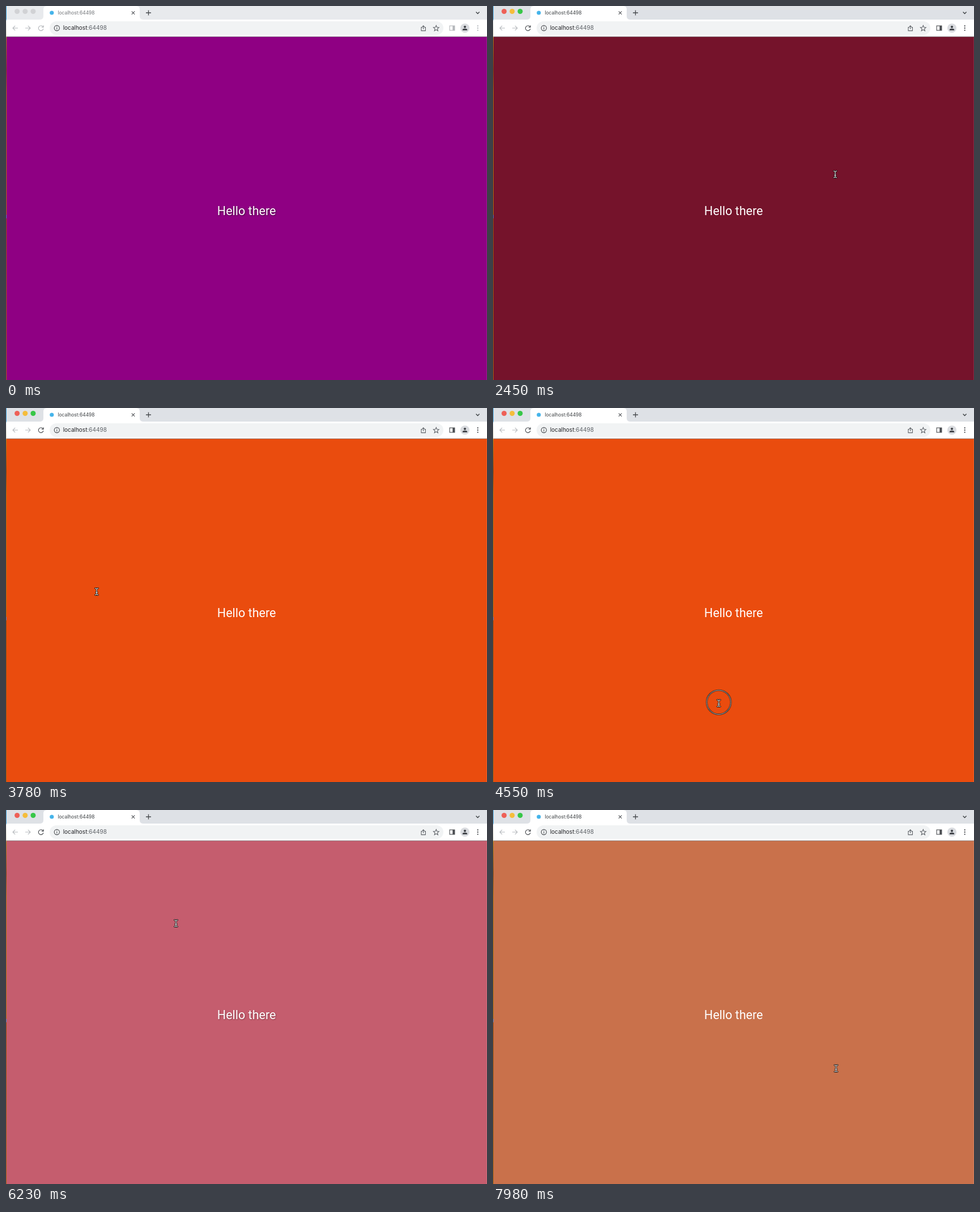
Recreate the animation shown at these times as an HTML page. Size 849 by 660 pixels, loop 8000 ms.

```html
<!DOCTYPE html>
<html lang="en">
<head>
<meta charset="utf-8">
<title>localhost:64498</title>
<style>
html, body { margin: 0; width: 100%; height: 100%; overflow: hidden; background: #fff; }
svg { display: block; animation: focus 8s step-end infinite; }
.ui { font-family: Inter, "Open Sans", sans-serif; }
.hello { font: 21.5px Roboto, sans-serif; fill: #fff; text-anchor: middle; animation: shade 8s step-end infinite; }
.line { fill: none; stroke: #5f6368; stroke-width: 1.1; }
.strip { fill: var(--strip); }
.tab { fill: var(--tab); }
.ink { stroke: var(--ink); }
.dot { fill: var(--ink); }
.page { animation: paint 8s step-end infinite; }
.cursor { animation: move 8s ease-in-out infinite; }
.ring { fill: none; animation: press 8s step-end infinite; }
.beam { fill: none; stroke-linecap: round; }

@keyframes focus {
  0% { --strip: #e8eaed; --tab: #73767a; --ink: #b4b7bb; --red: #d1d2d5; --amber: #d1d2d5; --green: #d1d2d5; }
  6.1%, 100% { --strip: #dee1e6; --tab: #3c4043; --ink: #4a4d51; --red: #ee6057; --amber: #f5bd3b; --green: #37c748; }
}
@keyframes paint {
  0% { fill: #8f0083; }
  16.6% { fill: #76685c; }
  27.1% { fill: #75132b; }
  36.7% { fill: #5b0950; }
  47.2% { fill: #ea4c0e; }
  57.7% { fill: #7a6e68; }
  67.3% { fill: #2458e2; }
  77.8% { fill: #c55d6e; }
  89.2% { fill: #7c7870; }
  98.8%, 100% { fill: #c9714b; }
}
@keyframes shade {
  0% { filter: drop-shadow(1px 1px 1px rgba(0, 0, 0, .55)); }
  16.6% { filter: none; }
  77.8% { filter: drop-shadow(1px 1px 1px rgba(0, 0, 0, .3)); }
  89.2%, 100% { filter: none; }
}
@keyframes press {
  0%, 6.1%, 16.6%, 27.1%, 36.7%, 47.2%, 57.7%, 67.3%, 77.8%, 89.2%, 98.8%, 100% { opacity: 0; }
  4.9%, 14.8%, 25.3%, 34.9%, 45.4%, 55.9%, 65.6%, 76%, 87.4%, 97% { opacity: 1; }
}
@keyframes move {
  0% { transform: translate(560px, 680px); }
  4.7%, 6.2% { transform: translate(520px, 430px); }
  14.6%, 16.8% { transform: translate(330px, 250px); }
  25.1%, 27.2% { transform: translate(590px, 290px); }
  30.6% { transform: translate(604px, 297px); }
  34.7%, 36.8% { transform: translate(420px, 460px); }
  42% { transform: translate(168.5px, 319px); }
  45.2%, 47.3% { transform: translate(160px, 324px); }
  55.6%, 57.8% { transform: translate(398.5px, 521px); }
  63% { transform: translate(684px, 300px); }
  65.5%, 67.6% { transform: translate(562.5px, 227px); }
  75.8%, 77.9% { transform: translate(300px, 200px); }
  87.2%, 89.3% { transform: translate(604px, 194px); }
  96.8%, 100% { transform: translate(605.5px, 456px); }
}
</style>
</head>
<body>
<svg width="849" height="660" viewBox="0 0 849 660">
  <defs>
    <linearGradient id="edge" x2="0" y2="1">
      <stop offset="0" stop-color="#3f9fd8"/>
      <stop offset=".035" stop-color="#3f9fd8"/>
      <stop offset=".04" stop-color="#e4e6e8"/>
      <stop offset=".08" stop-color="#d8d2c0"/>
      <stop offset=".085" stop-color="#a8841c"/>
      <stop offset=".17" stop-color="#7a4a12"/>
      <stop offset=".23" stop-color="#a8700f"/>
      <stop offset=".558" stop-color="#a8700f"/>
      <stop offset=".559" stop-color="#4a78c0"/>
      <stop offset=".567" stop-color="#4a78c0"/>
      <stop offset=".568" stop-color="#96500f"/>
      <stop offset="1" stop-color="#a06414"/>
    </linearGradient>
    <path id="ibeam" d="M-2.5-5.8Q0-5.8 0-4.4Q0-5.8 2.5-5.8M0-4.4V4.4M-2.5 5.8Q0 5.8 0 4.4Q0 5.8 2.5 5.8M-1.2 1.6H1.2"/>
  </defs>

  <!-- tab strip -->
  <rect class="strip" width="849" height="24"/>
  <path d="M59 24Q66 24 66 18V6Q66 0 72 0H230Q236 0 236 6V18Q236 24 243 24Z" fill="#fff"/>
  <circle cx="19.6" cy="9.5" r="4.5" fill="var(--red)"/>
  <circle cx="33.8" cy="9.5" r="4.5" fill="var(--amber)"/>
  <circle cx="47.9" cy="9.5" r="4.5" fill="var(--green)"/>
  <circle cx="80.8" cy="12" r="3.6" fill="#45b4ea"/>
  <text class="ui tab" x="91.5" y="15" font-size="8.45">localhost:64498</text>
  <path class="line" d="M221.8 9.4l5.4 5.4m0-5.4l-5.4 5.4" style="stroke:#505357"/>
  <path class="line" d="M247 12h9M251.5 7.5v9" style="stroke:#46494d;stroke-width:1.3"/>
  <path class="line" d="M829.6 10.5l3 3 3-3" style="stroke:#3c4043;stroke-width:1.3"/>

  <!-- toolbar -->
  <rect y="24" width="849" height="30" fill="#fff"/>
  <rect x="77" y="27" width="695" height="24" rx="12" fill="#f1f3f4"/>
  <path class="line" d="M21 39h-9m4.2-4.2L12 39l4.2 4.2M34 39h9m-4.2-4.2L43 39l-4.2 4.2" style="stroke:#b6b9bd"/>
  <path class="line ink" d="M65.3 36.6A4.4 4.4 0 1 0 66 40.2M66.1 34.2v3.3h-3.3" style="stroke-width:1.2"/>
  <circle class="line" cx="89.8" cy="39" r="4.6" style="stroke:#484b4f"/>
  <path class="line" d="M89.8 38.4v3.1M89.8 36.3v1.1" style="stroke:#484b4f"/>
  <text class="ui" x="100.7" y="42.4" font-size="10" fill="#202124">localhost<tspan fill="#5f6368">:64498</tspan></text>
  <path class="line" d="M734.8 37.6h-1.8v6h7.4v-6h-1.8M736.7 41v-6.2m-2 2l2-2 2 2"/>
  <path class="line" d="M759.3 34.3l1.4 3.3 3.5.3-2.7 2.3.8 3.5-3-1.9-3 1.9.8-3.5-2.7-2.3 3.5-.3Z"/>
  <rect class="line ink" x="783.1" y="35" width="8.8" height="8"/>
  <rect class="dot" x="788.3" y="35" width="3.6" height="8"/>
  <circle cx="810" cy="39" r="8" fill="#dadce0"/>
  <circle cx="810" cy="36.8" r="2.1" fill="#43464b"/>
  <path d="M805.8 43v-.8q0-2.4 4.2-2.4t4.2 2.4v.8Z" fill="#43464b"/>
  <g class="dot">
    <circle cx="832.7" cy="35.2" r="1.15"/>
    <circle cx="832.7" cy="39" r="1.15"/>
    <circle cx="832.7" cy="42.8" r="1.15"/>
  </g>

  <!-- page -->
  <rect class="page" y="54" width="849" height="606"/>
  <rect y="53" width="849" height="1" fill="#dcdee1"/>
  <rect y="54" width="849" height="1" fill="#858585" opacity=".55"/>
  <text class="hello" x="424.6" y="369">Hello there</text>
  <rect width="1" height="660" fill="url(#edge)"/>
  <rect x="848" y="55" width="1" height="605" fill="#fff" opacity=".12"/>

  <g class="cursor">
    <g class="ring">
      <circle cy="-1.7" r="21.3" stroke="#1c1c1c" stroke-width="2.5"/>
      <circle cy="-1.7" r="21.3" stroke="#fff" stroke-opacity=".75" stroke-width=".9"/>
    </g>
    <use class="beam" href="#ibeam" stroke="#151515" stroke-width="2.8"/>
    <use class="beam" href="#ibeam" stroke="#fff" stroke-width="1"/>
  </g>
</svg>
</body>
</html>
```
